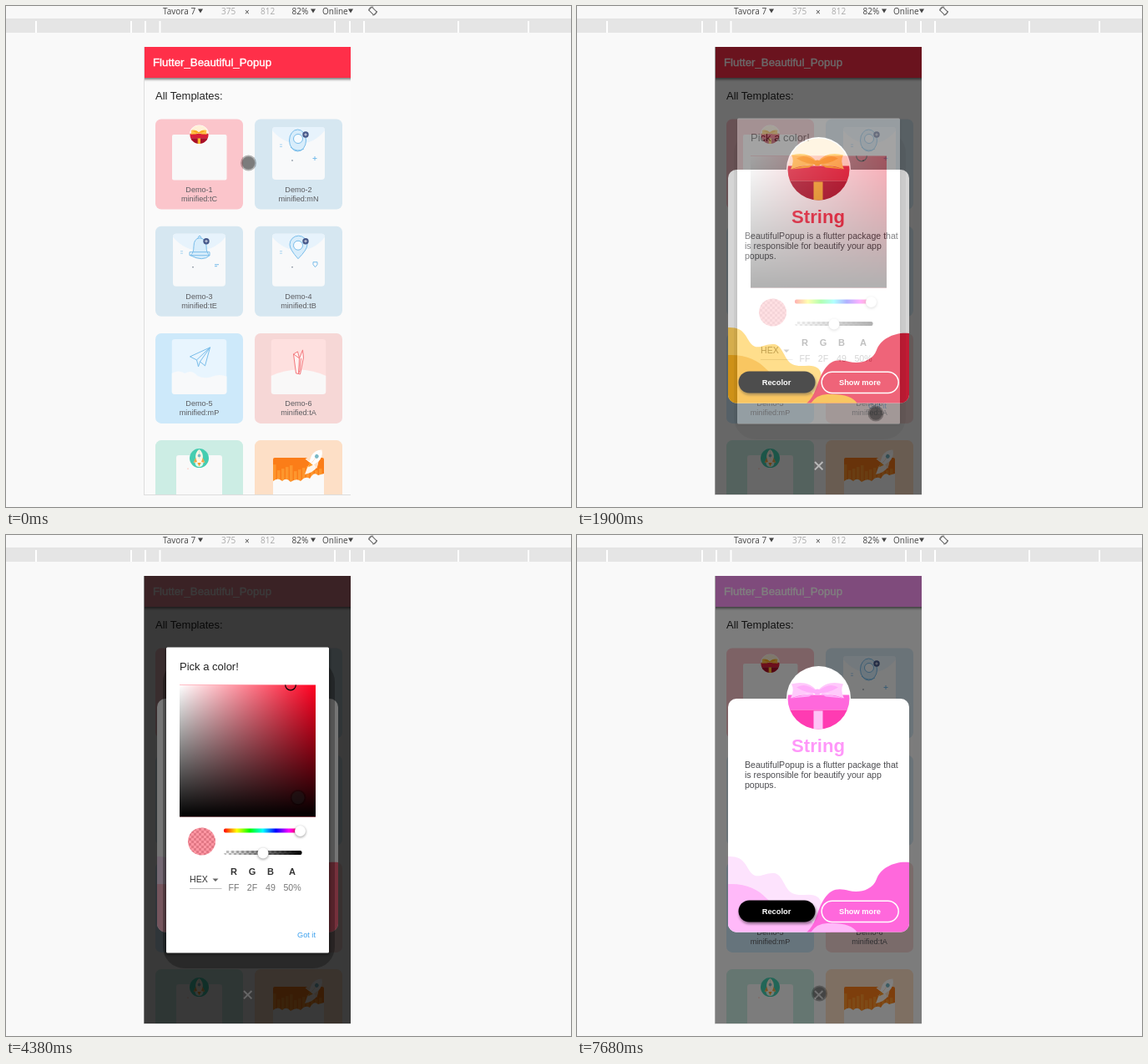
These frames come from a looping animation (677 px wide and 600 px high, 8 s). An HTML page:

```html
<!DOCTYPE html>
<html lang="en">
<head>
<meta charset="utf-8">
<title>Popup recolor demo</title>
<style>
html, body { margin: 0; width: 100%; height: 100%; overflow: hidden; background: #f9f9f9; }
svg { display: block; width: 677px; height: 600px; font-family: "Liberation Sans", Arial, sans-serif; }
.tool { font: 10px "Open Sans", "Noto Sans", sans-serif; fill: #444; }
.dim { fill: #aaa; }
.label { font-size: 9.1px; fill: #5c5c60; text-anchor: middle; }
.line { fill: none; stroke: #79bdea; stroke-linejoin: round; }
.pale { fill: #d8edfb; stroke: #79bdea; }
.red { fill: none; stroke: #f4777c; }
.bar { font-size: 13.24px; fill: #fff; stroke: #fff; stroke-width: .4; }
.sub { font-size: 13px; fill: #222; }
.title { font-size: 22.1px; font-weight: bold; fill: var(--title); text-anchor: middle; }
.body { font-size: 10.57px; fill: #4c4c50; }
.btn { font-size: 9.3px; font-weight: bold; fill: #fff; text-anchor: middle; }
.head { font-size: 11px; font-weight: bold; fill: #333; text-anchor: middle; }
.value { font-size: 10.6px; fill: #777; text-anchor: middle; }
.hex { font-size: 10.6px; fill: #333; }
.link { font-size: 9.2px; fill: #3ca0ee; }
.t0 { --bar: #ff2f49; --title: #ff2f49; --sky: #fff1d8; --bow: #f8a51b; --loop: #ffc348; --lid: #d91f38; --box: #a80f28;
  --rib: #f9b52c; --back: #ffd05b; --mid: #f7ae1d; --right: #e8213f; --btn: #ff2f49; --btn2: #ff5268; }
.t1 { --bar: #ff97a4; --title: #ff97a8; --sky: #fff; --bow: #ffafc0; --loop: #ffc8d4; --lid: #ff6a82; --box: #ff3d5b;
  --rib: #ffc2d0; --back: #fde3fb; --mid: #ffb9cb; --right: #ff6a82; --btn: #ff5770; --btn2: #ff7187; }
.t2 { --bar: #ff97f9; --title: #ff97f9; --sky: #fff; --bow: #ffaefa; --loop: #ffc9fb; --lid: #ff68dc; --box: #ff3bb2;
  --rib: #ffc3f7; --back: #fde3fd; --mid: #ffb9f9; --right: #ff68dc; --btn: #ff55f2; --btn2: #ff70f4; }
</style>
</head>
<body>
<svg id="stage" viewBox="0 0 677 600">
  <defs>
    <filter id="blur" x="-20%" y="-40%" width="140%" height="180%"><feGaussianBlur stdDeviation="1.8"/></filter>
    <clipPath id="screen"><rect x="166" y="49" width="247" height="536"/></clipPath>
    <clipPath id="ball"><circle r="37"/></clipPath>
    <clipPath id="sheet"><rect width="217" height="279.5" rx="10"/></clipPath>
    <clipPath id="field"><rect width="163" height="158"/></clipPath>
    <clipPath id="tile"><rect width="66" height="66" rx="4"/></clipPath>
    <pattern id="check" width="6" height="6" patternUnits="userSpaceOnUse">
      <rect width="6" height="6" fill="#fff"/><path d="M0 0h3v6h3v-3h-6z" fill="#c4c4c4"/></pattern>
    <linearGradient id="sat"><stop stop-color="#fff"/><stop offset="1" stop-color="#fff" stop-opacity="0"/></linearGradient>
    <linearGradient id="val" x2="0" y2="1"><stop stop-opacity="0"/><stop offset="1"/></linearGradient>
    <linearGradient id="alpha"><stop stop-opacity="0"/><stop offset="1"/></linearGradient>
    <linearGradient id="hues"></linearGradient>
    <linearGradient id="btn"><stop stop-color="var(--btn)"/><stop offset="1" stop-color="var(--btn2)"/></linearGradient>
  </defs>
  <g id="tools"></g>
  <g id="app"><g id="page"></g><g id="popup"></g><g id="dialog"></g></g>
  <g id="pointer"><circle r="9.5" opacity=".28"/><circle id="dot" r="7.7"/></g>
</svg>
<script>
const $ = id => document.getElementById(id);
const rect = (x, y, w, h, fill, r = 0, more = '') =>
  `<rect x="${x}" y="${y}" width="${w}" height="${h}" rx="${r}" fill="${fill}" ${more}/>`;
const circle = (x, y, r, fill, more = '') => `<circle cx="${x}" cy="${y}" r="${r}" fill="${fill}" ${more}/>`;
const path = (d, fill) => `<path d="${d}" fill="${fill}"/>`;
const line = (d, cls = 'line') => `<path class="${cls}" d="${d}"/>`;
const text = (x, y, s, cls, id = '') => `<text x="${x}" y="${y}" class="${cls}" id="${id}">${s}</text>`;
const at = (x, y, body, more = '') => `<g transform="translate(${x} ${y}) ${more}">${body}</g>`;
const clip = (id, body) => `<g clip-path="url(#${id})">${body}</g>`;
const mirror = body => body + `<g transform="scale(-1 1)">${body}</g>`;
const soft = (x, y, w, h, r, o) => rect(x, y, w, h, '#000', r, `opacity="${o}" filter="url(#blur)"`);
const veil = o => rect(165.5, 49, 247.5, 536, '#000', 0, `opacity="${o}"`);

$('hues').innerHTML = [...Array(7).keys()].map(i =>
  `<stop offset="${i / 6}" stop-color="hsl(${i * 60},100%,50%)"/>`).join('');

$('tools').innerHTML = rect(0, 0, 677, 16, '#f8f8f8') + rect(0, 15.5, 677, 1, '#d0d0d0') + rect(0, 17, 677, 15, '#e5e5e5') +
  [36, 150, 167, 184.5, 394, 412, 429, 542, 626].map(x => rect(x - 1, 18, 2, 14, '#fff')).join('') +
  text(188, 10, 'Tavora 7', 'tool') + text(258, 10, '375', 'tool dim') + text(286, 11, '×', 'tool') +
  text(305, 10, '812', 'tool dim') + text(342.5, 10, '82%', 'tool') + text(379, 10, 'Online', 'tool') +
  [233, 368, 413].map(x => path(`M${x - 3} 3.5h6l-3 5z`, '#444')).join('') +
  at(439.5, 6, circle(0, 0, 5, 'none', 'stroke="#777" stroke-dasharray="8 7.7"') +
    rect(-2.6, -4.2, 5.2, 8.4, 'none', 1, 'stroke="#666" transform="rotate(-45)"'));

// Gift in a ball around 0,0
const bow = mirror(path('M0 0C8-11 20-12 31-9Q27-2 32 8Q16 2 0 2Z', 'var(--loop)') +
  path('M0 0Q14-12 25-5Q14 2 0 2Q16 3 31 8L10 6Z', 'var(--bow)'));
const gift = circle(0, 0, 38.5, '#fff') + clip('ball', rect(-38, -38, 76, 76, 'var(--sky)') +
  rect(-38, -4, 76, 18, 'var(--lid)') + rect(-38, 14, 76, 25, 'var(--box)') + rect(-6, 15, 11, 24, 'var(--rib)') +
  at(-1.5, -8, bow + circle(0, .5, 3.6, 'var(--bow)')));

const blue = icon => rect(0, 0, 63, 63, '#f8f9fa', 4) + path('M0 4Q0 0 4 0H59Q63 0 63 4Q50 20 32 20T0 4Z', '#e7f3fc') +
  icon + circle(40, 9, 3.7, '#46588a') + line('M38.2 9h3.6M40 7.2v3.6" style="stroke:#fff;stroke-width:.7') +
  circle(24, 40, .7, '#456') + line('M9 21h3m-3 2.5h3" opacity=".6');
const lens = circle(31, 14, 5.5, '#f6fbff', 'stroke="#79bdea"');
const oval = '<ellipse class="pale" cx="30.5" cy="16" rx="10" ry="13"/>' + lens + line('M22 24q8 7 16 2m13 9v5m-2.5-2.5h5');
const bell = line('M21 26q4-3 4-11q0-9 7-10q8 1 8 10q0 8 4 11q-8 8-23 0z', 'pale') + line('M20 22h24v4h-24zM30 5q2-5 4 0M50 37h5m-5 2h3');
const pin = line('M31 30Q21 19 21 13a10.5 10.5 0 0 1 21 0Q42 19 31 30Z', 'pale') + lens + line('M49 34h5v3l-2.5 3-2.5-3z');
const plane = clip('tile', rect(0, 0, 66, 66, '#e8f5fe') + path('M0 41q8-5 16 0q8-5 15 3q8 4 17 1q9-4 19 0v21H0z', '#f8f9fa')) +
  line('M46 10L22 21l8 4L46 10l-6 22-6-5 12-17M30 25l2 8 2-6');
const pencil = clip('tile', rect(0, 0, 66, 66, '#fee0df') + path('M0 44Q33 29 66 44V66H0Z', '#f9f8f8')) +
  line('M27 18l5-3 2 8 4-10 1 9-4 20-5-1zl7 5-1 19M36 23l-2 17" style="fill:#fff1f0', 'red');

const ship = (skin, fin) => mirror(path('M0-11Q6-6 5 2l3 6-5 0H0z', skin) + path('M5 1l3 7-5-1z', fin)) +
  circle(0, -2, 2.2, '#7bb9c6') + path('M-2.5 8h5l-2.5 5z', '#ff9a27');
const green = rect(0, 18, 55, 52, '#f9f9f9', 3) + circle(27.5, 21.5, 11.5, '#45cdb0') +
  circle(27.5, 27, 5, '#dff8ef') + at(27.5, 20, ship('#fff6e6', '#f1a447'), 'scale(.85)') + circle(14, 34, .7, '#fa9');
const towers = [...Array(12).keys()].map(i => rect(i * 5, 29 + i * 7 % 9, 3.5, 20, '#ffab3e', 0, 'opacity=".55"')).join('');
const orange = rect(0, 21, 61, 50, '#fb7d18', 2) + towers +
  path('M0 49q6-5 11 0q5-5 10 1q7-5 12-1q6-7 11-3q5-9 10-4l7-2v31H0z', '#fafafa') +
  path('M38 41q4-13 8-14l6 6q-3 5-14 8z', '#fff4e8') + at(51, 21, ship('#fff', '#ffe0c4'), 'rotate(38) scale(1.1)');
const gifted = rect(20, 18.5, 65.5, 54.5, '#f9f9f9', 2) + `<g class="t0">${at(52.5, 18.5, gift, 'scale(.3)')}</g>`;

const cards = [
  ['#fbc5cb', gifted, 'tC'],
  ['#d6e7f1', at(21, 9.5, blue(oval)), 'mN'],
  ['#d6e7f1', at(21, 9, blue(bell)), 'tE'],
  ['#d6e7f1', at(21, 9, blue(pin)), 'tB'],
  ['#cde9fa', at(19.5, 7, plane), 'mP'],
  ['#f6d7d6', at(19.5, 7, pencil), 'tA'],
  ['#ccede4', at(25, 0, green), ''],
  ['#fddfc6', at(22, 0, orange), '']
].map(([fill, art, tag], i) => at(179 + i % 2 * 119, 135.5 + (i >> 1) * 128.2, rect(0, 0, 105, 108, fill, 7) + art +
  (tag && text(52.5, 87.5, 'Demo-' + (i + 1), 'label') + text(52.5, 98.5, 'minified:' + tag, 'label')))).join('');

$('page').innerHTML = rect(165, 49, 248, 537, '#dddddd') + clip('screen', rect(166, 49, 247, 536, '#fafafa') + cards +
  soft(164, 52, 251, 36, 0, .5) + rect(166, 49, 247, 37, 'var(--bar)') +
  text(176, 72, 'Flutter_Beautiful_Popup', 'bar') + text(179, 112, 'All Templates:', 'sub'));

// Waves at the foot of the sheet, from its top left corner
const waves = path('M0 189C20 188 21 201 28 209S44 208 55 209S67 228 77 233S100 231 108 238S106 258 123 280H0Z', 'var(--back)') +
  path('M0 222C21 221 36 228 46 239S73 245 85 251S97 273 121 280H0Z', 'var(--mid)') +
  path('M94 280C106 270 106 254 115 240S134 227 145 230S173 230 178 216S201 194 217 196V280Z', 'var(--right)') +
  path('M99 280q8-12 22-11q26-1 34 11z', 'var(--mid)');
const blurb = ['BeautifulPopup is a flutter package that', 'is responsible for beautify your app', 'popups.'];
const pill = (fill, more) => rect(193.5, 437.5, 92, 26, fill, 13, more);

$('popup').innerHTML = veil(.5) + at(181, 196, rect(0, 0, 217, 279.5, '#fff', 10) + clip('sheet', waves)) +
  at(289.5, 195.5, gift) + text(289, 260, 'String', 'title') +
  blurb.map((s, i) => text(201, 278.5 + i * 12.2, s, 'body')).join('') +
  soft(194, 440, 93, 26, 13, .4) + pill('url(#btn)') + pill('#000', 'id="press"') + text(239, 454, 'Recolor', 'btn') +
  rect(293.2, 438.2, 92, 25.2, 'none', 12.6, 'stroke="#fff" stroke-width="1.5"') + text(339, 454, 'Show more', 'btn') +
  at(289.7, 550.7, line('M-4.7-4.7l9.4 9.4m0-9.4l-9.4 9.4" style="stroke:#dcdcdc;stroke-width:2'));

const knob = (x, y, id) => `<g id="${id}" transform="translate(${x} ${y})">` +
  circle(0, 1, 6.8, '#000', 'opacity=".35" filter="url(#blur)"') + circle(0, 0, 6.5, '#fff') + '</g>';
const track = (y, fill) => rect(261, y, 93.5, 5, fill, 2);
const area = (fill, id = '') => rect(0, 0, 163, 158, fill, 0, `id="${id}"`);
const channels = [[273, 'R', 'FF'], [295, 'G', '2F'], [317, 'B', '49'], [343, 'A', '50%']];

$('dialog').innerHTML = veil(.54) + rect(188, 150, 206, 369, '#000', 26, 'opacity=".28"') +
  soft(191, 136, 197, 367, 2, .35) + rect(192, 134.5, 195, 366, '#fff', 1.5) + text(208, 162, 'Pick a color!', 'sub') +
  at(208, 179.5, area('red', 'tone') + area('url(#sat)') + area('url(#val)') +
    clip('field', circle(133, 0, 6.3, 'none', 'stroke="#000" stroke-width="1.2"'))) +
  circle(234.5, 367, 16.5, 'url(#check)') + circle(234.5, 367, 16.5, 'red', 'id="swatch" fill-opacity=".5"') +
  track(351.5, 'url(#hues)') + track(378, 'url(#check)') + track(378, 'url(#alpha)') +
  knob(352, 354.5, 'hue') + knob(308, 381, 'opac') +
  text(220, 416, 'HEX', 'hex') + path('M247.5 411.5h7l-3.5 3.5z', '#666') + rect(220, 423, 38.5, 1, '#c4c4c4') +
  channels.map(([x, h, v]) => text(x, 407, h, 'head') + text(x, 426, v, 'value', 'val' + h)).join('') +
  text(349, 482, 'Got it', 'link');

// Pointer: start time, x, y, and whether it is pressed
const moves = [
  [0, 290.5, 188], [230, 240, 220, true], [470, 273, 487], [700, 247.5, 468.5], [940, 223.5, 456.5, true],
  [1170, 223.5, 456.5], [1420, 358, 490], [1640, 363, 491, true], [1900, 358, 488], [2400, 348, 480.5],
  [3120, 266, 443.5], [3840, 255, 446, true], [4380, 350, 314.5], [4730, 350, 354.5], [5070, 349.5, 357.5, true],
  [5410, 339, 357.5, true], [5740, 361, 477], [6080, 361, 482, true], [6410, 361, 483], [6950, 347.5, 488.5],
  [7680, 290.5, 549]
];

function pose([t, x, y, down]) {
  const open = t >= 470;
  const theme = t >= 6410 ? 2 : t >= 2400 ? 1 : 0;
  const picking = t >= 1170 && t < 1900 || t >= 4380 && t < 6410;
  const fade = picking ? 1 : t === 1900 ? .3 : 0;
  const pink = t >= 5410;
  const hue = pink ? 303 : 352.5;
  $('app').setAttribute('class', 't' + theme);
  $('popup').style.display = open ? '' : 'none';
  $('dialog').style.display = fade ? '' : 'none';
  $('dialog').style.opacity = fade;
  $('press').setAttribute('opacity', down && !fade ? .08 : 0);
  $('tone').setAttribute('fill', `hsl(${hue},100%,50%)`);
  $('swatch').setAttribute('fill', pink ? '#ff2ff3' : '#ff2f49');
  $('hue').setAttribute('transform', `translate(${261 + hue / 360 * 93.5} 354.5)`);
  $('valB').textContent = pink ? 'F3' : '49';
  $('pointer').setAttribute('transform', `translate(${x} ${y})`);
  $('dot').setAttribute('fill', down ? '#c9bd3c' : '#222');
  $('dot').setAttribute('opacity', down ? .85 : .38);
}

let last;
function show() {
  const time = performance.now() % 8000;
  const move = moves.filter(m => m[0] <= time).pop();
  if (move !== last) pose(last = move);
  requestAnimationFrame(show);
}
show();
</script>
</body>
</html>
```
